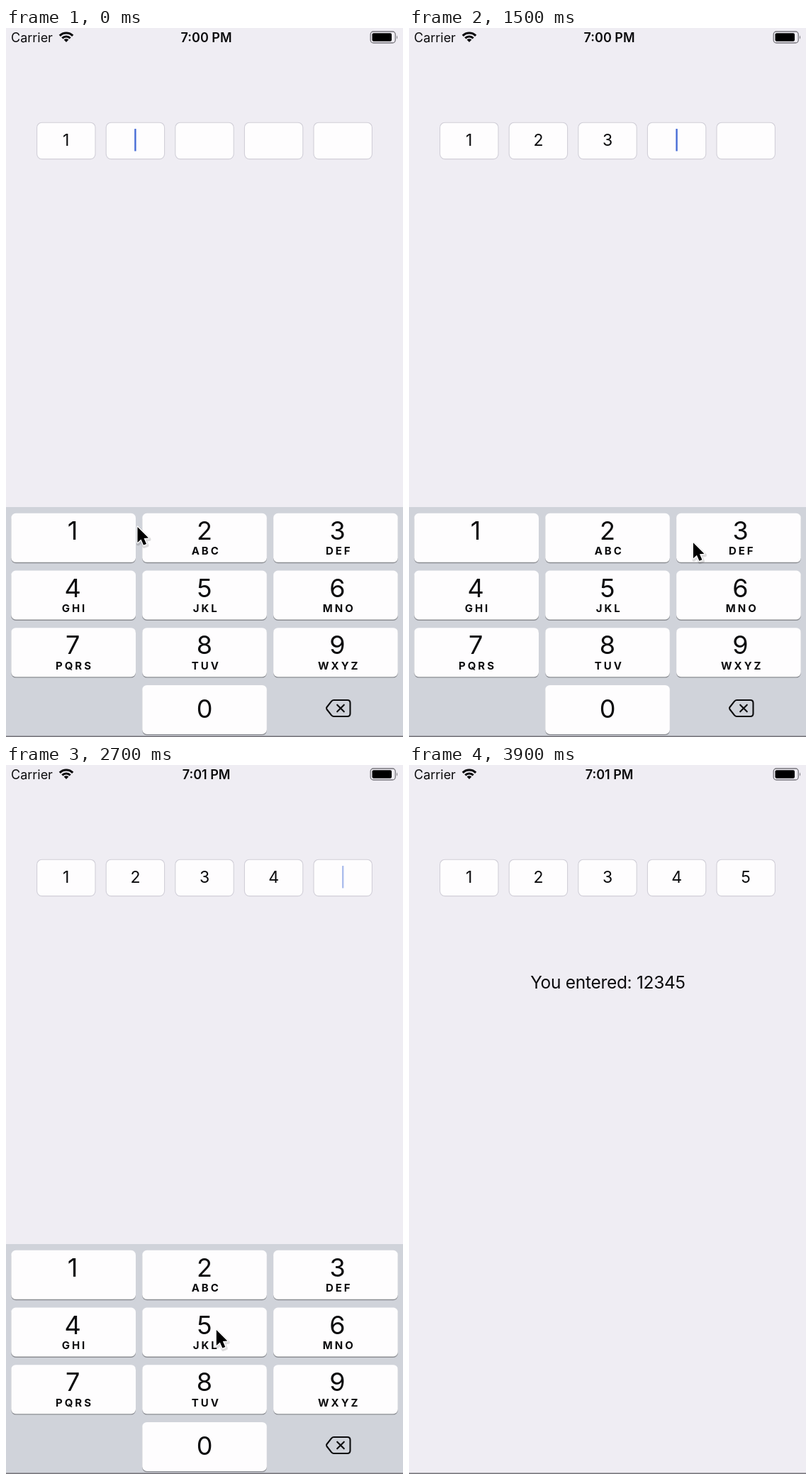
These frames come from a looping animation (560x999 px, 4800 ms). An HTML page:

```html
<!DOCTYPE html>
<html lang="en">
<head>
<meta charset="utf-8">
<title>Code entry</title>
<style>
  html, body { margin: 0; width: 100%; height: 100%; overflow: hidden; background: #efedf3; }
  svg { display: block; width: 100vw; height: 100vh; }
  text { font-family: Inter, Roboto, sans-serif; fill: #0b0b0d; }
  .mid { text-anchor: middle; }
  .digit { font-size: 36px; }
  .letters { font-size: 15px; font-weight: 700; letter-spacing: 3px; }
  .code { font-size: 23px; }
  .status { font-size: 18px; }
  .clock { font-weight: 600; }
  .label { font-size: 24.5px; letter-spacing: -0.3px; }
</style>
</head>
<body>
<svg id="stage" viewBox="0 0 560 999" preserveAspectRatio="none">
  <rect width="560" height="999" fill="#efedf3"/>
  <text class="status" x="7" y="19.5">Carrier</text>
  <g id="wifi" fill="none" stroke="#0b0b0d"></g>
  <text class="status clock mid" id="clock" x="282.5" y="19.5"></text>
  <rect x="514.2" y="5" width="35" height="16" rx="4" fill="none" stroke="#77767c" stroke-width="1.3"/>
  <rect x="516.5" y="7.2" width="27.5" height="11.6" rx="2"/>
  <path d="M551 10.2q2.2 2.8 0 5.6z" fill="#77767c"/>
  <g id="fields"></g>
  <rect id="caret" y="142" width="2.4" height="31.5" rx="0.6" fill="#476cd6"/>
  <text class="label mid" id="label" x="280.5" y="314.5">You entered: 12345</text>
  <g id="pad">
    <rect y="675" width="560" height="330" fill="#d0d3da"/>
    <g id="keys"></g>
    <path d="M462.5 947H481.500q4 0 4 4v15q0 4-4 4H462.500q-2 0-3.400-1.600l-6.600-8.400q-1.200-1.500 0-3l6.600-8.400Q460.500 947 462.500 947zM467.200 953.700l9.600 9.600m0-9.600l-9.600 9.600"
      fill="none" stroke="#0b0b0d" stroke-width="2.1" stroke-linecap="round" stroke-linejoin="round"/>
  </g>
  <rect y="997.4" width="560" height="1.600" fill="#77767c"/>
  <g id="pointer">
    <path d="M1 2V24l5-4.500 3.500 8 4-1.500-3.500-8 6.500-.5z" fill="none" stroke="#000" stroke-opacity=".13" stroke-width="5" stroke-linejoin="round"/>
    <path d="M0 0V22l5-4.500 3.500 8 4-1.500-3.500-8 6.500-.5z" stroke="#fff" stroke-width="2.600" stroke-linejoin="round" paint-order="stroke"/>
  </g>
</svg>
<script>
const LOOP = 4800, STEP = 100;
const $ = id => document.getElementById(id);

function add(parent, tag, attrs, text) {
  const el = document.createElementNS('http://www.w3.org/2000/svg', tag);
  for (const k in attrs) el.setAttribute(k, attrs[k]);
  if (text) el.textContent = text;
  parent.appendChild(el);
  return el;
}

// Wi-Fi fan
for (const [r, w] of [[13, 3.2], [8, 3.1], [2.4, 4.8]]) {
  const d = r * Math.SQRT1_2;
  add($('wifi'), 'path', {
    d: `M${85 - d} ${20 - d}A${r} ${r} 0 0 1 ${85 + d} ${20 - d}`, 'stroke-width': w
  });
}

// Code fields
const fieldX = i => 84.8 + 97.6 * i;
const entries = [0, 1, 2, 3, 4].map(i => {
  add($('fields'), 'rect', {
    x: fieldX(i) - 41.2, y: 133.2, width: 82.4, height: 51.4, rx: 7,
    fill: '#fefdfe', stroke: '#d1cfd8', 'stroke-width': 1.1
  });
  return add($('fields'), 'text', { class: 'code mid', x: fieldX(i), y: 166 }, String(i + 1));
});

// Number pad
const letters = ['', 'ABC', 'DEF', 'GHI', 'JKL', 'MNO', 'PQRS', 'TUV', 'WXYZ'];
const textX = [94.2, 280, 467.5];

function makeKey(n, col, row) {
  const y = 683.8 + 80.7 * row;
  const box = { x: 7.3 + 184.9 * col, width: 175.7, height: 69, rx: 6.5 };
  add($('keys'), 'rect', { ...box, y: y + 1.4, fill: '#8b8d92' });
  const face = add($('keys'), 'rect', { ...box, y });
  add($('keys'), 'text', { class: 'digit mid', x: textX[col], y: y + (n ? 37.2 : 46.2) }, String(n));
  if (n > 1) {
    add($('keys'), 'text', { class: 'letters mid', x: textX[col] + 2.3, y: y + 58.4 }, letters[n - 1]);
  }
  return face;
}
const faces = [makeKey(0, 1, 3)];
for (let n = 1; n <= 9; n++) faces.push(makeKey(n, (n - 1) % 3, Math.floor((n - 1) / 3)));

// Key presses: digit, down, up
const presses = [[1, -300, -100], [2, 300, 500], [3, 1200, 1400], [4, 2000, 2200], [5, 2800, 2900]];

// Pointer legs: start, end, x, y, easing
const smooth = p => p * p * (3 - 2 * p);
const legs = [
  [0, 300, 266.8, 705.5, smooth],
  [600, 1200, 432.8, 716, smooth],
  [1400, 1900, 126.5, 804.5, smooth],
  [2200, 2600, 296.8, 796, smooth],
  [3500, 3800, 430.5, 718, p => p ** 2.5]
];
const clamp = v => Math.min(1, Math.max(0, v));

function pointerAt(t) {
  let x = 185.5, y = 703;
  for (const [a, b, tx, ty, ease] of legs) {
    const k = ease(clamp((t - a) / (b - a)));
    x += (tx - x) * k;
    y += (ty - y) * k;
  }
  return [x, y];
}

// Full, quick fade, short gap, quick return
function blink(age) {
  const p = age % 700;
  return clamp(1 - (p - 450) / 90) + clamp((p - 630) / 60);
}

function draw(t) {
  const typed = presses.filter(p => t >= p[2]).length;
  const last = presses[typed - 1][2];
  entries.forEach((el, i) => el.setAttribute('visibility', i < typed ? 'visible' : 'hidden'));
  faces.forEach((el, n) => {
    const down = presses.some(p => p[0] === n && t >= p[1] && t < p[2]);
    el.setAttribute('fill', down ? '#b5c2cf' : '#fefdfe');
  });

  $('caret').setAttribute('x', fieldX(typed) - 1.2);
  $('caret').setAttribute('opacity', typed < 5 ? blink(t - last) : 0);
  $('label').setAttribute('visibility', typed === 5 ? 'visible' : 'hidden');
  $('clock').textContent = t < 1600 ? '7:00 PM' : '7:01 PM';

  const p = clamp((t - 2900) / 350);
  $('pad').setAttribute('transform', `translate(0 ${326 * (1 - (1 - p) ** 2)})`);

  const [x, y] = pointerAt(t);
  $('pointer').setAttribute('transform', `translate(${x} ${y})`);
  $('pointer').setAttribute('visibility', t < 3900 ? 'visible' : 'hidden');
}

let start;
function tick(now) {
  if (start === undefined) start = now;
  const t = (now - start) % LOOP;
  draw(Math.floor(t / STEP) * STEP);
  requestAnimationFrame(tick);
}
draw(0);
requestAnimationFrame(tick);
</script>
</body>
</html>
```
